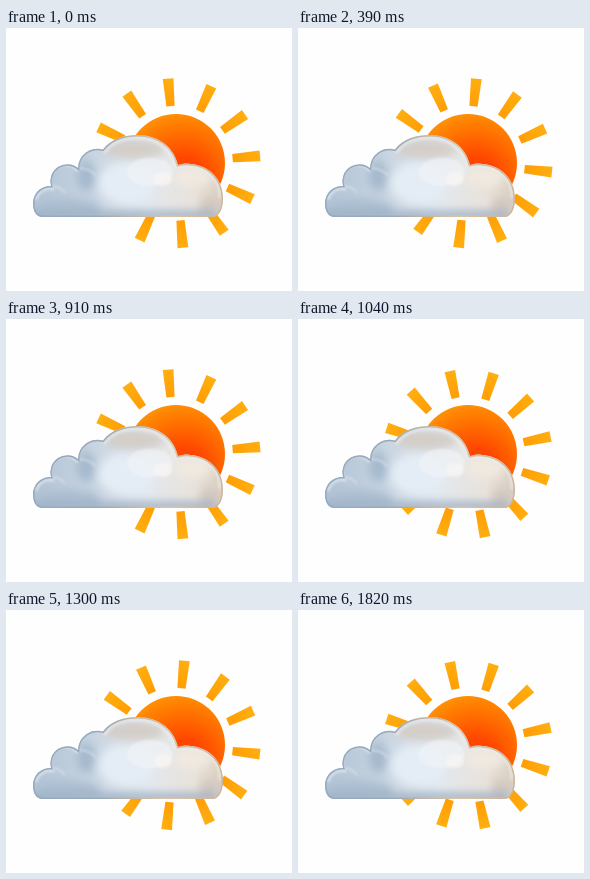
An HTML page that plays this animation: 286 by 263 pixels, repeating every 1920 ms.

```html
<!DOCTYPE html>
<html lang="en">
<head>
<meta charset="utf-8">
<title>Sun behind a cloud</title>
<style>
  html, body { margin: 0; width: 100%; height: 100%; overflow: hidden; background: #fefefe; }
  svg { display: block; }
</style>
</head>
<body>
<svg width="286" height="263" viewBox="0 0 286 263">
  <defs>
    <radialGradient id="disk" gradientUnits="userSpaceOnUse" cx="178" cy="150" r="68">
      <stop offset=".3" stop-color="#ff4600"/>
      <stop offset=".55" stop-color="#ff6200"/>
      <stop offset=".8" stop-color="#ff7d00"/>
      <stop offset="1" stop-color="#ff9408"/>
    </radialGradient>
    <linearGradient id="rayFill" x1="0" y1="0" x2="0" y2="1">
      <stop offset="0" stop-color="#ffae10"/>
      <stop offset="1" stop-color="#ff9e04"/>
    </linearGradient>
    <linearGradient id="body">
      <stop offset="0" stop-color="#b2c3d5"/>
      <stop offset=".3" stop-color="#c6d3e0"/>
      <stop offset=".6" stop-color="#e3e8ee"/>
      <stop offset=".85" stop-color="#e8e2db"/>
      <stop offset="1" stop-color="#dacdbe"/>
    </linearGradient>
    <linearGradient id="rim">
      <stop offset="0" stop-color="#95abc1"/>
      <stop offset=".35" stop-color="#98aabb"/>
      <stop offset=".5" stop-color="#bdb3a6"/>
      <stop offset=".7" stop-color="#d8c2a8"/>
      <stop offset="1" stop-color="#cdb59a"/>
    </linearGradient>
    <path id="cloud" d="M36 189C29 188 27 182 27 175A17 17 0 0 1 45 158A17 17 0 0 1 72 140A19.5 19.5 0 0 1 97 121.500C105 111 118 107 132 107C152 107 168 119 172 137C176 136 180 135 184 136C204 137 217 152 217 170C217 180 214 187 208 189Z"/>
    <clipPath id="inside"><use href="#cloud"/></clipPath>
    <filter id="soft" x="-50%" y="-50%" width="200%" height="200%"><feGaussianBlur stdDeviation="4"/></filter>
    <filter id="fine"><feGaussianBlur stdDeviation="1"/></filter>
    <path id="ray" d="M-5.4-84.9H5.4L4.1-57.3H-4.1Z" fill="url(#rayFill)"/>
  </defs>

  <g id="rays"></g>
  <circle cx="170" cy="135" r="49" fill="url(#disk)"/>

  <g clip-path="url(#inside)">
    <use href="#cloud" fill="url(#body)"/>
    <g filter="url(#soft)">
      <ellipse cx="62" cy="180" rx="32" ry="9" fill="#abbdd0"/>
      <ellipse cx="80" cy="148" rx="9" ry="15" fill="#a5b9cd"/>
      <ellipse cx="128" cy="121" rx="31" ry="10" fill="#d3cec8"/>
      <ellipse cx="120" cy="155" rx="28" ry="21" fill="#e4edf5"/>
      <ellipse cx="187" cy="149" rx="20" ry="10" fill="#f0e9e0"/>
      <ellipse cx="204" cy="178" rx="10" ry="9" fill="#d0c7c0"/>
      <rect x="25" y="183" width="186" height="8" fill="#9eb0c5"/>
    </g>
    <g filter="url(#fine)">
      <ellipse cx="144" cy="144" rx="23" ry="14" fill="#f1f4f7" opacity=".65"/>
      <ellipse cx="157" cy="151" rx="9" ry="7" fill="#f7f5f2" opacity=".8"/>
      <path d="M72 140Q84 140 90 148M45 158Q54 158 59 165" fill="none" stroke="#dce5ee" stroke-width="2" opacity=".6"/>
      <path d="M30 172A14 14 0 0 1 46 161A14 14 0 0 1 72 143A16 16 0 0 1 99 124C107 113 120 110 132 110C150 110 165 121 169 139C203 134 214 152 214 170" fill="none" stroke="#eceff2" stroke-width="3" opacity=".6"/>
    </g>
    <use href="#cloud" fill="none" stroke="url(#rim)" stroke-width="3"/>
  </g>
</svg>
<script>
  const LOOP = 1920, STEP = 130;
  const angles = [6, 3, 0, -5, -12, -18];
  const rays = document.getElementById('rays');

  rays.innerHTML = Array.from({ length: 12 }, (_, i) =>
    `<use href="#ray" transform="rotate(${i * 30})"/>`).join('');

  function draw(now) {
    const tick = Math.floor(now % LOOP / STEP);
    const pose = tick > 3 ? tick - 1 : tick; // the fourth pose is held for two ticks
    const angle = angles[(pose + 3) % angles.length];
    rays.setAttribute('transform', `translate(169.5 135.2) rotate(${angle})`);
  }

  let start;
  function loop(now) {
    start ??= now;
    draw(now - start);
    requestAnimationFrame(loop);
  }
  draw(0);
  requestAnimationFrame(loop);
</script>
</body>
</html>
```
